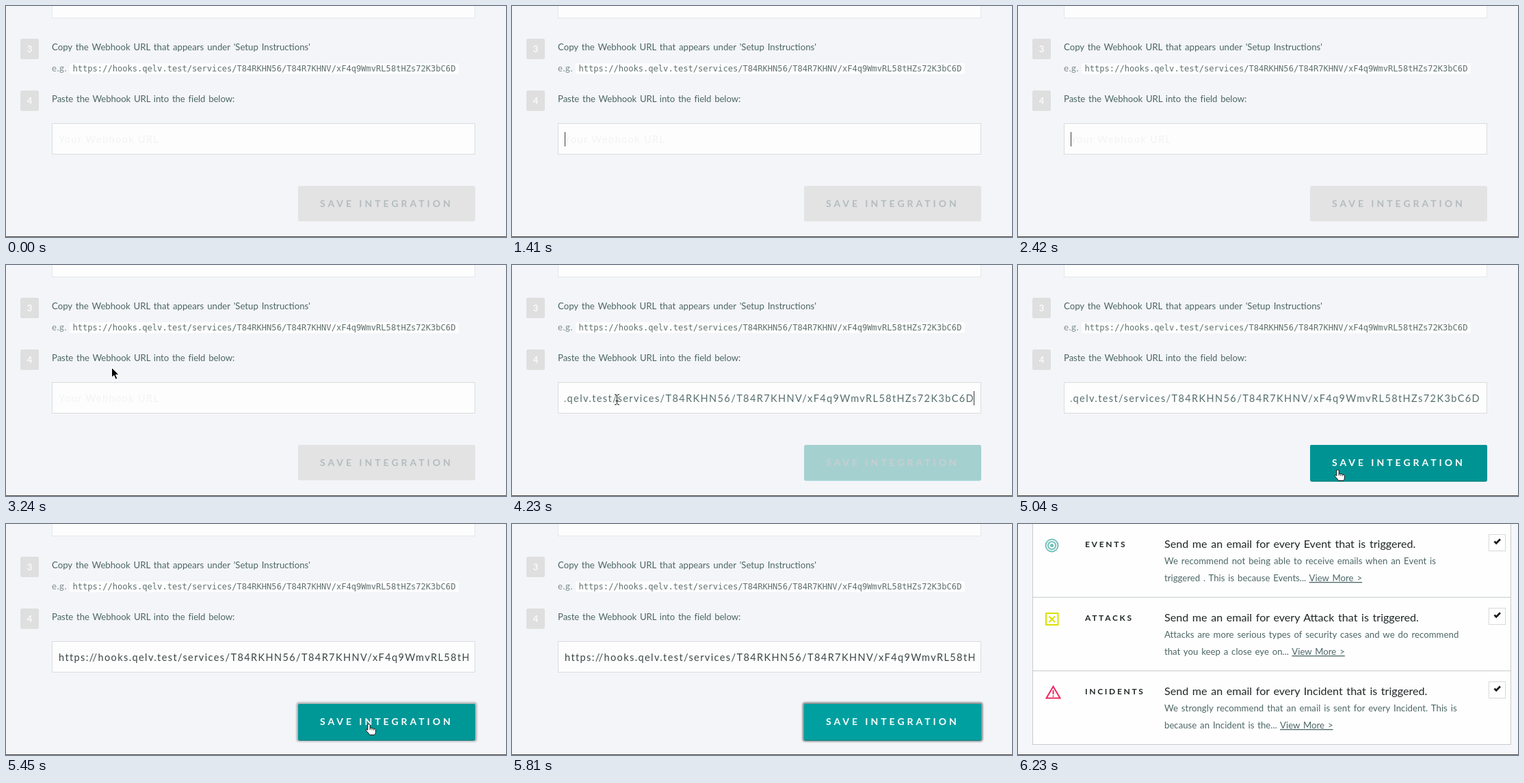
Write an HTML page that moves like this. It is 731 px wide and 339 px high and loops after 8 s.

```html
<!DOCTYPE html>
<html lang="en">
<head>
<meta charset="utf-8">
<title>Webhook setup</title>
<style>
  html, body { margin: 0; width: 100%; height: 100%; overflow: hidden; background: #f4f5f9; }
  svg { display: block; width: 731px; height: 339px; }
  text { font-family: Lato, sans-serif; white-space: pre; }
  .body { font-size: 13.2px; word-spacing: 1.5px; fill: #4c6665; }
  .note { letter-spacing: .5px; fill: #7d8e8e; }
  .code { font: 12.08px "DejaVu Sans Mono", monospace; fill: #60706f; }
  .badge { font-size: 13px; font-weight: 700; fill: #fafafa; text-anchor: middle; }
  .entry { font-size: 14.5px; letter-spacing: 1.4px; }
  .save { font-size: 14px; font-weight: 700; letter-spacing: 3.96px; }
  .label { font-size: 12px; font-weight: 700; letter-spacing: 2.7px; fill: #1f2626; }
  .title { font-size: 16.1px; word-spacing: 1.5px; fill: #1f2626; }
  .link { text-decoration: underline; }
</style>
</head>
<body>
<svg viewBox="0 0 731 339">
  <defs>
    <clipPath id="fieldClip"><rect x="77" y="174" width="599" height="42"/></clipPath>
    <filter id="soft" x="-5%" y="-20%" width="110%" height="140%"><feGaussianBlur stdDeviation="1"/></filter>
  </defs>

  <rect width="731" height="339" fill="#f4f5f9"/>
  <g id="form">
    <rect x="67.5" y="-30.5" width="618" height="48" fill="#fdfdfd" stroke="#e5e7ea"/>
    <g id="badges"></g>
    <text class="body" x="67" y="65">Copy the Webhook URL that appears under 'Setup Instructions'</text>
    <text class="body note" x="67" y="96">e.g.</text>
    <rect x="93" y="84" width="569" height="16" rx="3" fill="#fdfdfd"/>
    <text class="code url" x="97.5" y="96"></text>
    <text class="body" x="67" y="141" letter-spacing="-.08">Paste the Webhook URL into the field below:</text>

    <rect x="67.5" y="172.5" width="618" height="45" fill="#fdfdfd" stroke="#dadcdc"/>
    <g clip-path="url(#fieldClip)">
      <text id="hint" class="entry" x="77" y="201" fill="#f2f3f4">Your Webhook URL</text>
      <text id="entry" class="entry url" y="201"></text>
    </g>
    <rect id="caret" y="185" width="1" height="21" fill="#3c3c3c"/>

    <rect id="glow" x="424.5" y="261.5" width="264" height="58" rx="4" fill="#8c8f90" filter="url(#soft)"/>
    <rect x="427" y="264" width="259" height="52" rx="3" fill="#e3e3e3"/>
    <text class="save" x="459" y="295" fill="#b3bcbf">SAVE INTEGRATION</text>
    <g id="active">
      <rect id="edge" x="427" y="264" width="259" height="54" rx="3" fill="#007f80"/>
      <rect x="427" y="264" width="259" height="53" rx="3" fill="#00a0a0"/>
      <rect id="hover" x="427" y="264" width="259" height="53" rx="3" fill="#009393"/>
      <text class="save" x="459" y="295" fill="#fff">SAVE INTEGRATION</text>
    </g>
  </g>

  <g id="alerts">
    <rect width="731" height="339" fill="#f5f6f9"/>
    <rect x="21.5" y="-10.5" width="699" height="334" fill="#fefefe" stroke="#c8cccc"/>
    <path d="M22 107.5H720M22 215.5H720" stroke="#c8cccc"/>
    <g fill="none" stroke="#74c2bb" stroke-width="2">
      <circle cx="49.5" cy="31.5" r="9"/>
      <circle cx="49.5" cy="31.5" r="5.6"/>
      <circle cx="49.5" cy="31.5" r="2.6" fill="#74c2bb" stroke="none"/>
    </g>
    <path d="M41 131h17.500v17h-17.500zM45.500 135.500l8.500 8.500m0-8.500l-8.500 8.500" fill="none" stroke="#d9e000" stroke-width="2"/>
    <path d="M51.500 238.500l10 17h-20zM51.500 244v6m0 1.500v2" fill="none" stroke="#f0265f" stroke-width="2"/>
    <g id="rows"></g>
  </g>

  <rect y="338" width="731" height="1" fill="#4b4747"/>

  <g id="cursor">
    <path id="arrow" d="M0 0v14.500l3.300-3 2.500 5.700 2.600-1.100-2.500-5.500h4.600z" fill="#000" stroke="#fff"/>
    <path id="beam" d="M-3.500-7.500q3 0 3.500 1.500q.5-1.500 3.500-1.500M0-6V6M-3.500 7.500q3 0 3.500-1.500q.5 1.500 3.500 1.500M-2 2h4" fill="none" stroke="#111"/>
    <path id="hand" d="M-1.700 1q1.700-2 3.400 0v5q2-1 2.800.500q2-1 2.800.700q2-.500 2.700 1v3.500q0 2.500-2 4.300h-7q-1-2.500-3.500-4.500q-3-3.500-.700-3.700l1.500 1.200zM1.700 6v2.500M4.500 7v2M7.300 7.500v1.800" fill="#fff" stroke="#111"/>
  </g>
</svg>

<script>
const LOOP = 8000;
const URL_TEXT = 'https://hooks.qelv.test/services/T84RKHN56/T84R7KHNV/xF4q9WmvRL58tHZs72K3bC6D';
const $ = id => document.getElementById(id);

document.querySelectorAll('.url').forEach(node => node.textContent = URL_TEXT);

$('badges').innerHTML = [[3, 48], [4, 124]].map(([n, y]) => `
  <rect x="21" y="${y}" width="27" height="30" rx="2.5" fill="#dfdfdf"/>
  <text class="badge" x="34.500" y="${y + 20}">${n}</text>`).join('');

const alerts = [
  ['Event', 'We recommend not being able to receive emails when an Event is',
    'triggered . This is because Events... '],
  ['Attack', 'Attacks are more serious types of security cases and we do recommend',
    'that you keep a close eye on... '],
  ['Incident', 'We strongly recommend that an email is sent for every Incident. This is',
    'because an Incident is the... ']
];
$('rows').innerHTML = alerts.map(([name, first, second], i) => `
  <g transform="translate(0 ${i * 108})">
    <text class="label" x="98" y="34">${name.toUpperCase()}S</text>
    <text class="title" x="214" y="35">Send me an email for every ${name} that is triggered.</text>
    <text class="body" x="214" y="59" letter-spacing=".04">${first}</text>
    <text class="body" x="214" y="84">${second}<tspan class="link">View More &gt;</tspan></text>
    <rect x="688.500" y="15.500" width="24" height="24" fill="#fff" stroke="#d6d9da"/>
    <path d="M696.500 25.500l2.700 2.700 5.800-6" fill="none" stroke="#1c1c1c" stroke-width="2.800"/>
  </g>`).join('');

// Time, x, y and pointer shape; an empty shape hides the pointer.
const pointer = [
  [0, -20, 138, ''],
  [2930, -4, 138, 'arrow'], [3000, 20, 138, 'arrow'], [3080, 70, 141, 'arrow'],
  [3160, 130, 146, 'arrow'], [3240, 154, 150, 'arrow'], [3300, 156, 173, 'beam'],
  [3420, 153, 197, 'beam'], [4530, 153, 197, 'beam'], [4570, 110, 197, 'beam'],
  [4680, 6, 197, ''],
  [4830, 200, 232, 'arrow'], [4930, 360, 275, 'arrow'], [4990, 440, 293, 'hand'],
  [5040, 467, 300, 'hand'], [5200, 505, 297, 'hand'], [5340, 530, 293, 'hand'],
  [5650, 530, 293, 'hand'], [5690, 575, 295, 'hand'], [5740, 645, 298, 'hand'],
  [5770, 695, 300, 'arrow'], [5810, 735, 300, '']
];
const PASTE = 4170, CLICK = 5400;
const caretOn = [[480, 960], [1410, 1910], [2420, 2930], [3420, 3900], [PASTE, 4680], [5180, CLICK]];

const ramp = (t, from, to) => Math.min(1, Math.max(0, (t - from) / (to - from)));
const show = (id, amount) => $(id).setAttribute('opacity', +amount);

function drawPointer(t) {
  const i = pointer.findLastIndex(step => step[0] <= t);
  const [time, x, y, shape] = pointer[i];
  const next = pointer[i + 1] || pointer[i];
  const k = next[0] > time ? ramp(t, time, next[0]) : 0;
  const px = Math.round(x + (next[1] - x) * k);
  const py = Math.round(y + (next[2] - y) * k);
  $('cursor').setAttribute('transform', `translate(${px + .5} ${py + .5})`);
  for (const id of ['arrow', 'beam', 'hand']) show(id, id === shape);
}

function render(t) {
  const pasted = t >= PASTE, blurred = t >= CLICK;
  const entry = $('entry');
  entry.setAttribute('x', blurred ? 77 : 676);
  entry.setAttribute('text-anchor', blurred ? 'start' : 'end');
  entry.setAttribute('fill', blurred ? '#3b4646' : '#566e6d');
  show('entry', pasted);
  show('hint', !pasted);
  $('caret').setAttribute('x', pasted ? 675 : 77);
  show('caret', caretOn.some(([from, to]) => t >= from && t < to));

  show('active', ramp(t, PASTE, 4400));
  show('edge', t >= 4300);
  show('hover', ramp(t, 4940, 5040) - ramp(t, CLICK, 5560));
  show('glow', ramp(t, CLICK, 5480));
  show('alerts', t < 6080 ? 0 : t < 6150 ? .33 : t < 6230 ? .67 : 1);
  drawPointer(t);
}

const start = performance.now();
function tick() {
  render((performance.now() - start) % LOOP);
  requestAnimationFrame(tick);
}
tick();
</script>
</body>
</html>
```
